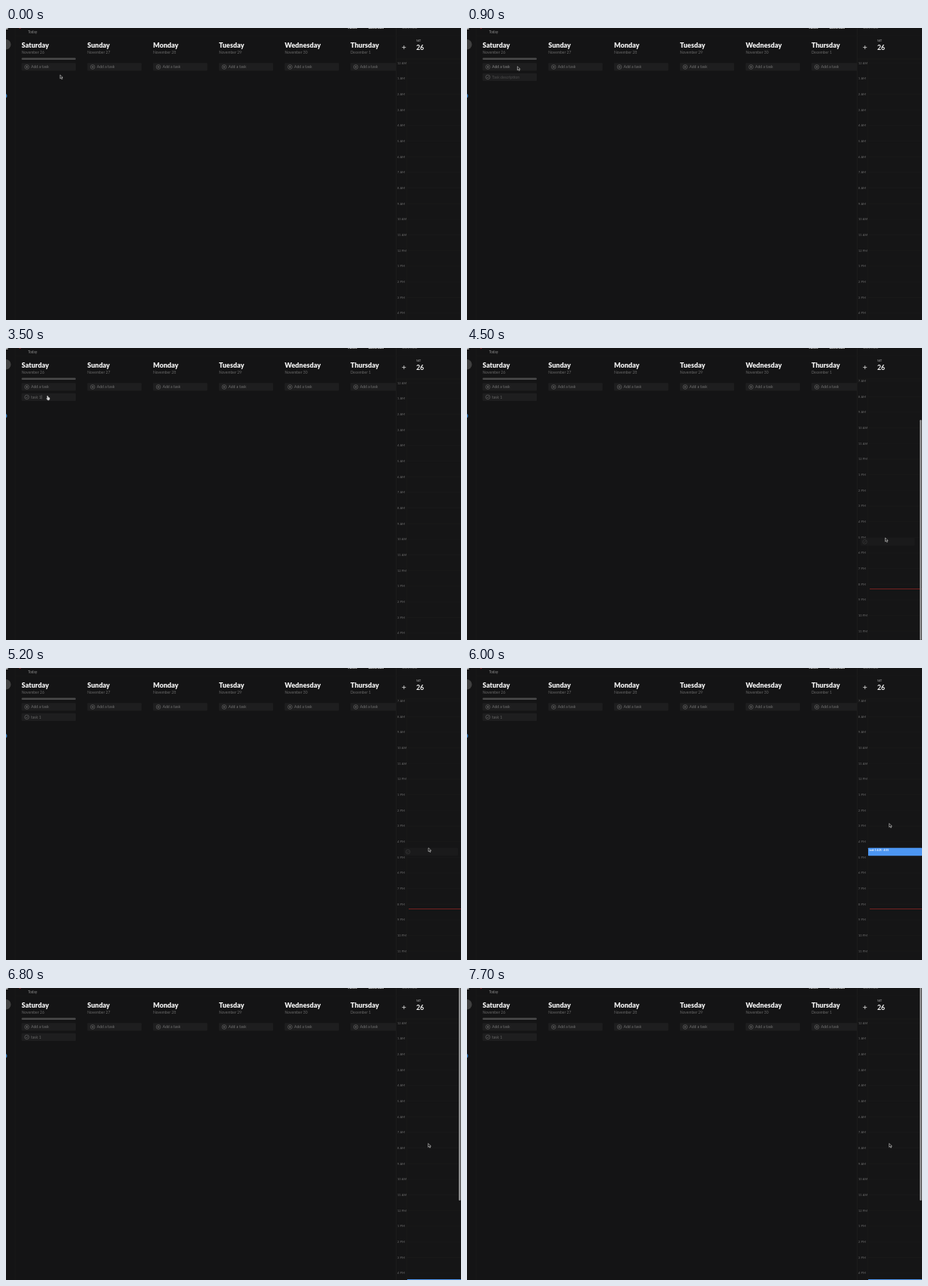
Recreate the animation shown at these times as an HTML page with a canvas. Size 600 by 386 pixels, loop 8 s.

```html
<!DOCTYPE html>
<html lang="en">
<head>
<meta charset="utf-8">
<title>Task planner</title>
<style>
  html, body { margin: 0; width: 100%; height: 100%; overflow: hidden; background: #141415; }
  canvas { display: block; width: 600px; height: 386px; }
</style>
</head>
<body>
<canvas id="stage"></canvas>
<script>
const LOOP = 8000, STEP = 100;
const HOUR = 20.67, PANEL = 514.5;
const DAYS = [
  ['Saturday', 'November 26'], ['Sunday', 'November 27'], ['Monday', 'November 28'],
  ['Tuesday', 'November 29'], ['Wednesday', 'November 30'], ['Thursday', 'December 1']
];
const TYPED = [[1600, 't'], [1800, 'ta'], [2000, 'tas'], [2100, 'task'], [2300, 'task 1']];

// Keyframes: [time, value, ...]
const POINTER = [
  [0, 71.3, 62], [700, 67, 49], [2400, 53, 97], [3300, 54, 63.5], [3500, 54, 63.5],
  [4100, 549, 249], [4200, 551.5, 251], [4500, 551.5, 251], [4900, 557, 240],
  [5000, 557, 240], [5300, 557, 237], [5500, 557, 237], [6000, 556.7, 205.5]
];
const SCROLL = [[3800, 0], [4300, 147.3], [6100, 147.3], [6800, 0], [7200, 0], [7400, -8], [7700, 0]];
const THUMB_ALPHA = [[3700, 0], [3900, 1], [4600, 1], [4900, 0], [6100, 0], [6200, 1]];

const canvas = document.getElementById('stage');
const ratio = window.devicePixelRatio || 1;
canvas.width = 600 * ratio;
canvas.height = 386 * ratio;
const ctx = canvas.getContext('2d');
ctx.scale(ratio, ratio);
ctx.textBaseline = 'alphabetic';

function track(keys, t) {
  if (t <= keys[0][0]) return keys[0].slice(1);
  const next = keys.findIndex(key => key[0] > t);
  if (next < 0) return keys[keys.length - 1].slice(1);
  const a = keys[next - 1], b = keys[next];
  const p = (t - a[0]) / (b[0] - a[0]);
  const eased = p * p * (3 - 2 * p);
  return a.slice(1).map((v, i) => v + (b[i + 1] - v) * eased);
}

function rect(x, y, w, h, color, radius = 0) {
  ctx.fillStyle = color;
  ctx.beginPath();
  ctx.roundRect(x, y, w, h, radius);
  ctx.fill();
}

function text(str, x, y, size, color, weight = 400) {
  ctx.font = `${weight} ${size}px Lato, sans-serif`;
  ctx.fillStyle = color;
  ctx.fillText(str, x, y);
}

function disc(x, y, r, color) {
  ctx.fillStyle = color;
  ctx.beginPath();
  ctx.arc(x, y, r, 0, 7);
  ctx.fill();
}

function line(points, color, width) {
  ctx.strokeStyle = color;
  ctx.lineWidth = width;
  ctx.beginPath();
  points.forEach(([x, y]) => ctx.lineTo(x, y));
  ctx.stroke();
}

function clipped(x, y, w, h, draw) {
  ctx.save();
  ctx.beginPath();
  ctx.rect(x, y, w, h);
  ctx.clip();
  draw();
  ctx.restore();
}

function icon(x, y, check, color = '#707070') {
  ctx.strokeStyle = color;
  ctx.lineWidth = 0.6;
  ctx.beginPath();
  ctx.arc(x, y, 2.8, 0, 7);
  ctx.stroke();
  if (check) {
    line([[x - 1.3, y], [x - 0.4, y + 1], [x + 1.4, y - 1]], color, 0.6);
  } else {
    line([[x - 1.5, y], [x + 1.5, y]], color, 0.6);
    line([[x, y - 1.5], [x, y + 1.5]], color, 0.6);
  }
}

function row(x, y, check) {
  rect(x, y, 71.5, 10.3, '#1e1e1f', 1);
  icon(x + 7, y + 5.2, check);
}

function drawTopBar() {
  line([[12, 10.5], [600, 10.5]], '#191919', 0.6);
  line([[12, 0], [12, 386]], '#1b1b1b', 0.8);
  disc(-0.3, 21.8, 6.8, '#404040');
  disc(-1.3, 89.7, 2.8, '#2f76b8');
  rect(0, 0, 2.5, 2, '#aaa');
  disc(18.5, -0.8, 1.6, '#a33');
  text('Today', 29, 7, 4.7, '#8c8c8c');
  text('Tasks', 450, 1, 5.4, '#eee', 700);
  text('Calendar', 477.5, 1, 5.4, '#eee', 700);
  text('Calendar', 522, 1, 5.4, '#858585');
}

function drawDays(t) {
  clipped(0, 0, PANEL, 386, () => DAYS.forEach(([day, date], i) => {
    const x = 20.5 + 86.75 * i;
    text(day, x, 25.6, 9, '#f4f4f4', 900);
    text(date, x, 33.5, 5, '#6a6a6a');
    row(x, 46.3, false);
    const hovered = i === 0 && t >= 600 && t < 1600;
    text('Add a task', x + 12.5, 53.3, 5.15, hovered ? '#888' : '#727272');
  }));
  rect(20.5, 39.5, 71.5, 2.4, '#4a4a4a', 1.2);
}

function drawTask(t) {
  if (t < 900) return;
  row(20.5, 59.7, true);
  if (t < 1600) {
    text('Task description', 33, 66.7, 5.1, '#4c4c4c');
    return;
  }
  const label = TYPED.filter(([start]) => t >= start).pop()[1];
  text(label, 33, 66.7, 5.1, t < 2500 ? '#7c7c7c' : '#686868');
  if (t < 3600) rect(33.3 + ctx.measureText(label).width, 62.3, 0.5, 5.2, '#888');
}

function hourLabel(hour) {
  return `${hour % 12 || 12} ${hour < 12 ? 'AM' : 'PM'}`;
}

function drawCalendar(t, scroll) {
  rect(PANEL, 0, 86, 386, '#151516');
  line([[PANEL, 0], [PANEL, 386]], '#1e1e1e', 0.8);
  clipped(PANEL, 41, 86, 345, () => {
    line([[528.5, 41], [528.5, 386]], '#1b1b1b', 0.6);
    for (let hour = 0; hour < 24; hour++) {
      const y = 46.2 + hour * HOUR - scroll;
      text(hourLabel(hour), 516, y + 1.5, 4.1, '#6c6c6c');
      line([[529, y], [600, y]], '#1c1c1c', 0.6);
    }
    if (t >= 5600) {
      const y = 385 - scroll;
      rect(529, y, 71, 10.5, '#4c96f2', 0.6);
      text('task 1 4:25 - 4:55', 530.5, y + 4, 3.3, '#fff', 700);
    }
    line([[531, 465.8 - scroll], [600, 465.8 - scroll]], '#8c2522', 0.8);
  });
  line([[PANEL, 41], [600, 41]], '#1b1b1b', 0.6);
  line([[522.3, 25.6], [527.3, 25.6]], '#ddd', 0.8);
  line([[524.8, 23.1], [524.8, 28.1]], '#ddd', 0.8);
  text('SAT', 541, 18, 3.6, '#aaa');
  text('26', 541, 28.6, 8.8, '#f4f4f4', 700);
}

function drawThumb(t, scroll) {
  ctx.globalAlpha = track(THUMB_ALPHA, t)[0];
  const top = -10 + Math.max(scroll, 0) * 0.713;
  rect(597, top, 2.6, 291 + Math.min(scroll, 0), '#8c8c8c', 1.3);
  ctx.globalAlpha = 1;
}

function drawGhost(t, [x, y]) {
  if (t < 3600 || t >= 5600) return;
  ctx.globalAlpha = 0.55;
  rect(x - 32.5, y, 71.5, 10.3, '#202020', 1);
  icon(x - 27, y + 5.2, true, '#5c5c5c');
  ctx.globalAlpha = 1;
}

function drawPointer(t, [x, y]) {
  if (t >= 1600 && t < 2500) return;
  ctx.save();
  ctx.translate(x, y);
  const hand = t >= 3200 && t < 3600;
  const shape = hand
    ? 'M.2 .2L1.1 0L1.6 1.8L3.3 2.3L3.5 4.1L2.8 5.3H1L-.5 3.2L.7 3.2Z'
    : 'M0 0V4.9L1.2 3.8L2.1 5.7L3 5.3L2.1 3.5H3.7Z';
  const path = new Path2D(shape);
  ctx.fillStyle = hand ? '#ddd' : '#111';
  ctx.strokeStyle = '#d6d6d6';
  ctx.lineWidth = 0.6;
  ctx.fill(path);
  ctx.stroke(path);
  ctx.restore();
}

function render(now) {
  const t = Math.floor((now % LOOP) / STEP) * STEP;
  const pointer = track(POINTER, t);
  const [scroll] = track(SCROLL, t);
  rect(0, 0, 600, 386, '#141415');
  drawDays(t);
  drawTask(t);
  drawCalendar(t, scroll);
  drawTopBar();
  drawThumb(t, scroll);
  drawGhost(t, pointer);
  drawPointer(t, pointer);
}

const start = performance.now();
function frame() {
  render(performance.now() - start);
  requestAnimationFrame(frame);
}
frame();
</script>
</body>
</html>
```
